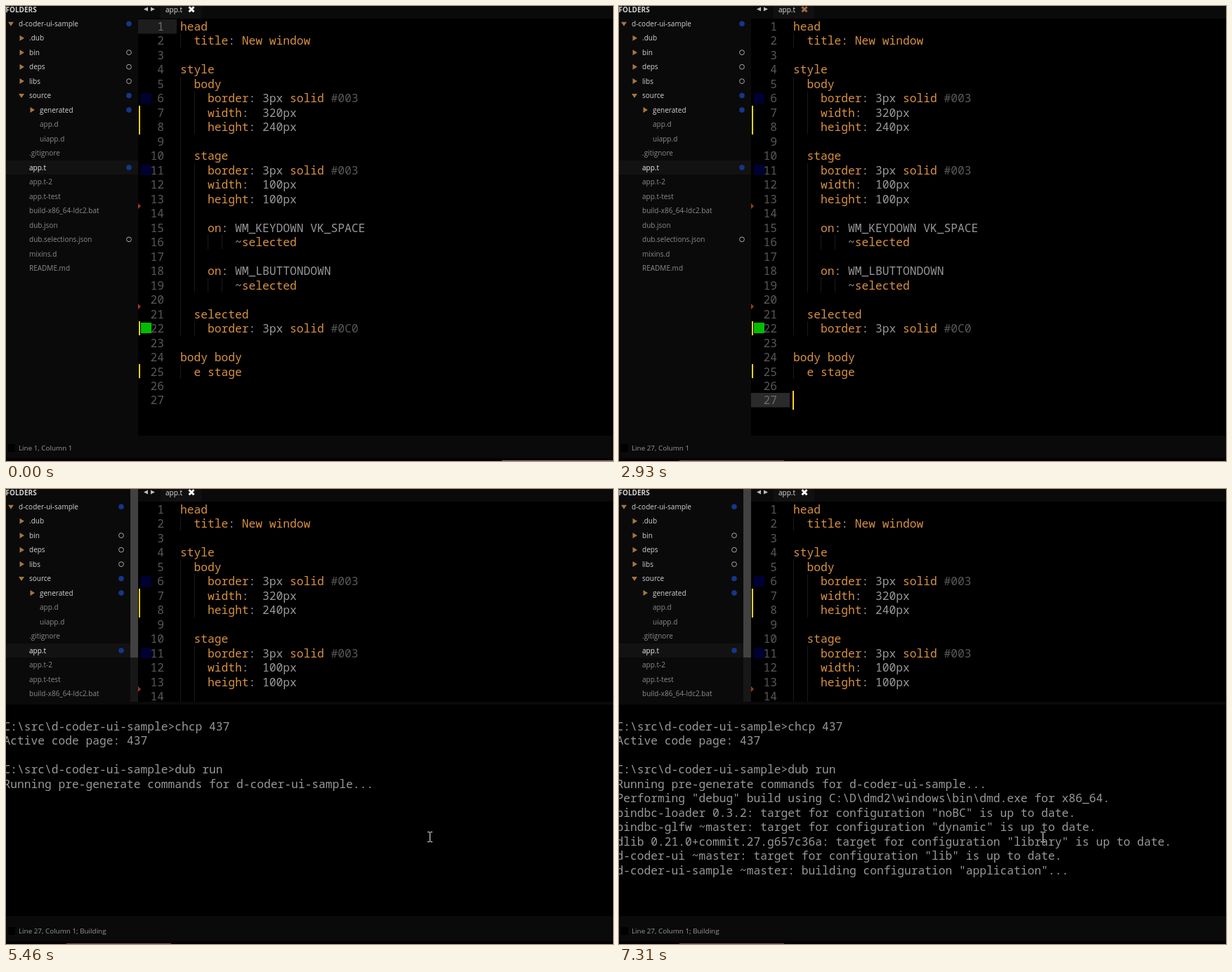
Recreate the animation shown at these times as an HTML page with a canvas. Size 864 by 648 pixels, loop 8000 ms.

```html
<!DOCTYPE html>
<html lang="en">
<head>
<meta charset="utf-8">
<title>Editor build</title>
<style>
html, body { margin: 0; width: 100%; height: 100%; overflow: hidden; background: #000; }
canvas { display: block; }
</style>
</head>
<body>
<canvas id="stage" width="864" height="648"></canvas>
<script>
const ctx = document.getElementById('stage').getContext('2d');
const LOOP = 8000, PITCH = 20.48, CHAR = 9.75;
const MONO = '16.25px "Noto Sans Mono", "DejaVu Sans Mono", monospace';
const UI = '10px "Open Sans", "Noto Sans", sans-serif';
const STATUS = '9.85px "Open Sans", "Noto Sans", sans-serif';
const ORANGE = '#d8913f', GRAY = '#989898', DIM = '#585858';
const YELLOW = '#ffd21e', BAR = '#0a0a0a';

const code = `head
  title: New window

style
  body
    border: 3px solid #003
    width:  320px
    height: 240px

  stage
    border: 3px solid #003
    width:  100px
    height: 100px

    on: WM_KEYDOWN VK_SPACE
        ~selected

    on: WM_LBUTTONDOWN
        ~selected

  selected
    border: 3px solid #0C0

body body
  e stage

`.split('\n');

// [column, first line, last line]
const guides = [[0, 2, 2], [0, 5, 22], [0, 25, 25], [2, 6, 8], [2, 11, 19], [2, 22, 22],
  [4, 16, 16], [6, 16, 16], [4, 19, 19], [6, 19, 19]];

// [indent, label, arrow, badge]
const tree = [
  [18, 'd-coder-ui-sample', 'open', 'dot'], [33, '.dub', 'closed'],
  [33, 'bin', 'closed', 'ring'], [33, 'deps', 'closed', 'ring'],
  [33, 'libs', 'closed', 'ring'], [33, 'source', 'open', 'dot'],
  [48, 'generated', 'closed', 'dot'], [48, 'app.d'], [48, 'uiapp.d'],
  [33, '.gitignore'], [33, 'app.t', '', 'dot'], [33, 'app.t-2'], [33, 'app.t-test'],
  [33, 'build-x86_64-ldc2.bat'], [33, 'dub.json'],
  [33, 'dub.selections.json', '', 'ring'], [33, 'mixins.d'], [33, 'README.md']
];

// [time, row, text]
const output = [
  [4390, 0, 'C:\\src\\d-coder-ui-sample>chcp 437'],
  [4460, 1, 'Active code page: 437'],
  [4590, 3, 'C:\\src\\d-coder-ui-sample>dub run'],
  [5460, 4, 'Running pre-generate commands for d-coder-ui-sample...'],
  [6830, 5, 'Performing "debug" build using C:\\D\\dmd2\\windows\\bin\\dmd.exe for x86_64.'],
  [6900, 6, 'bindbc-loader 0.3.2: target for configuration "noBC" is up to date.'],
  [6900, 7, 'bindbc-glfw ~master: target for configuration "dynamic" is up to date.'],
  [7170, 8, 'dlib 0.21.0+commit.27.g657c36a: target for configuration "library" is up to date.'],
  [7240, 9, 'd-coder-ui ~master: target for configuration "lib" is up to date.'],
  [7310, 10, 'd-coder-ui-sample ~master: building configuration "application"...']
];

// [time, line, column]
const carets = [[0, 1, 1], [830, 24, 10], [2030, 24, 1], [2580, 25, 1], [2820, 26, 1], [2930, 27, 1]];

const lineTop = n => 18.8 + (n - 1) * PITCH;

function rect(x, y, w, h, color) {
  ctx.fillStyle = color;
  ctx.fillRect(x, y, w, h);
}

function text(str, x, y, color, font) {
  ctx.font = font;
  ctx.fillStyle = color;
  ctx.fillText(str, x, Math.round(y));
}

function poly(color, ...pts) {
  ctx.fillStyle = color;
  ctx.beginPath();
  for (let i = 0; i < pts.length; i += 2) ctx.lineTo(pts[i], pts[i + 1]);
  ctx.fill();
}

function clipped(x, y, w, h, draw) {
  ctx.save();
  ctx.beginPath();
  ctx.rect(x, y, w, h);
  ctx.clip();
  draw();
  ctx.restore();
}

function treeShift(t) {
  if (t < 6170 || t >= 6960) return 0;
  return t < 6240 || t >= 6900 ? -16 : -PITCH;
}

function badge(kind, x, y) {
  ctx.beginPath();
  ctx.arc(x, y, kind === 'dot' ? 3.8 : 3.4, 0, Math.PI * 2);
  if (kind === 'dot') {
    ctx.fillStyle = '#15368a';
    ctx.fill();
  } else {
    ctx.strokeStyle = '#a8a8a8';
    ctx.lineWidth = 1;
    ctx.stroke();
  }
}

function drawSidebar(t, building) {
  const shift = treeShift(t);
  rect(0, 0, 188, 648, BAR);
  text('FOLDERS', -0.5, 8.5, '#d0d0d0', 'bold ' + UI);
  tree.forEach(([x, label, arrow, mark], i) => {
    if (shift && i === 6) return;
    const y = 25.2 + i * PITCH + (i > 6 ? shift : 0);
    const active = label === 'app.t';
    if (active) rect(0, Math.round(y - 10), 188, 20, '#121212');
    const ax = x - 11;
    if (arrow === 'open') poly('#a5773f', ax - 4, y - 2.5, ax + 4, y - 2.5, ax, y + 3.5);
    if (arrow === 'closed') poly('#a5773f', ax - 2.5, y - 4, ax + 4, y, ax - 2.5, y + 4);
    text(label, x, y + 3.8, active ? '#f2f2f2' : arrow ? '#d2d2d2' : '#8a8a8a', UI);
    if (mark && !(shift && i === 5)) badge(mark, building ? 164 : 175, y);
  });
  if (building) {
    rect(177, 0, 11, 303, '#171717');
    rect(177, 0, 11, t >= 6240 && t < 6900 ? 254 : 240, '#414141');
  }
}

function drawTabs(dimClose) {
  rect(188, 0, 676, 18, BAR);
  rect(220, 0, 58, 18, '#101010');
  poly('#bdbdbd', 196, 4.5, 202, 1.5, 202, 7.5);
  poly('#bdbdbd', 212, 4.5, 206, 1.5, 206, 7.5);
  text('app.t', 227, 8.5, '#dedede', UI);
  ctx.strokeStyle = dimClose ? '#a5693f' : '#ffffff';
  ctx.lineWidth = 3;
  ctx.beginPath();
  ctx.moveTo(260.5, 1.2); ctx.lineTo(267.5, 8.2);
  ctx.moveTo(267.5, 1.2); ctx.lineTo(260.5, 8.2);
  ctx.stroke();
}

function drawCode(line, y) {
  for (const m of line.matchAll(/#\w+|\d+px|[A-Z]{2}_\w+|[~:]|\w+/g)) {
    const word = m[0];
    const color = word[0] === '#' ? DIM : /^(\d|[A-Z]{2}_|[~:])/.test(word) ? GRAY : ORANGE;
    text(word, 248 + m.index * CHAR, y, color, MONO);
  }
}

function drawEditor(line, column, focused, building) {
  rect(188, 18, 676, 630, '#000');
  for (const [col, a, b] of guides)
    rect(Math.round(248 + col * CHAR), lineTop(a), 1, (b - a + 1) * PITCH, '#1a1a1a');
  if (!building)
    rect(188, Math.round(lineTop(line)), 55, 20.5, focused ? '#2a2a2a' : '#1d1d1d');
  for (const [a, n] of [[7, 2], [22, 1], [25, 1]])
    rect(189, Math.round(lineTop(a)), 2, Math.round(n * PITCH), YELLOW);
  for (const [n, color] of [[6, '#000033'], [11, '#000033'], [22, '#00bd00']])
    rect(192, Math.round(lineTop(n) + 2.5), 15, 15, color);
  for (const y of [285, 428]) poly('#a2381a', 188, y - 4, 192, y, 188, y + 4);
  code.forEach((str, i) => {
    const y = lineTop(i + 1) + 16.2;
    const num = String(i + 1);
    text(num, 225 - num.length * CHAR, y, i + 1 === line && !building ? '#6c6c6c' : DIM, MONO);
    drawCode(str, y);
  });
  if (focused && !building)
    rect(Math.round(247 + (column - 1) * CHAR), Math.round(lineTop(line) - 3), 2, 27, YELLOW);
}

function drawPanel(t) {
  rect(0, 303, 864, 4, BAR);
  rect(0, 307, 864, 301, '#000');
  for (const [at, row, str] of output)
    if (t >= at) text(str, -3.5, 344 + row * PITCH, GRAY, MONO);
}

function drawStatus(t, line, column, building) {
  const top = building ? 608 : 612;
  rect(0, top, 864, 648 - top, BAR);
  rect(3, 624, 10, 11, '#000');
  text(`Line ${line}, Column ${column}${building ? '; Building' : ''}`, 18, 633, GRAY, STATUS);
  rect(0, 644, 864, 4, '#060204');
  if (t < 830) rect(706, 647, t < 630 ? 158 : 149, 1, '#8a7078');
  else rect(86, 647, 149, 1, '#6a5058');
}

function drawPointer(t) {
  if (t < 160 || (t >= 2030 && t < 4590)) return;
  const p = Math.min(1, Math.floor((t - 160) / 67) / 7);
  const left = (1 - p) ** 2;
  const x = Math.round(603 + 245 * left), y = Math.round(495 + 140 * left);
  rect(x, y - 6, 1, 13, '#f0f0f0');
  for (const dy of [-7, 7]) {
    rect(x - 3, y + dy, 3, 1, '#f0f0f0');
    rect(x + 1, y + dy, 3, 1, '#f0f0f0');
  }
}

function render(t) {
  const building = t >= 4320;
  const [, line, column] = carets.filter(c => c[0] <= t).pop();
  const height = building ? 303 : 612;
  rect(0, 0, 864, 648, '#000');
  clipped(0, 0, 864, height, () => {
    drawEditor(line, column, t >= 830, building);
    drawTabs(t >= 290 && !building);
    drawSidebar(t, building);
  });
  if (building) drawPanel(t);
  drawStatus(t, line, column, building);
  drawPointer(t);
}

const start = performance.now();
function frame() {
  render((performance.now() - start) % LOOP);
  requestAnimationFrame(frame);
}
frame();
</script>
</body>
</html>
```
